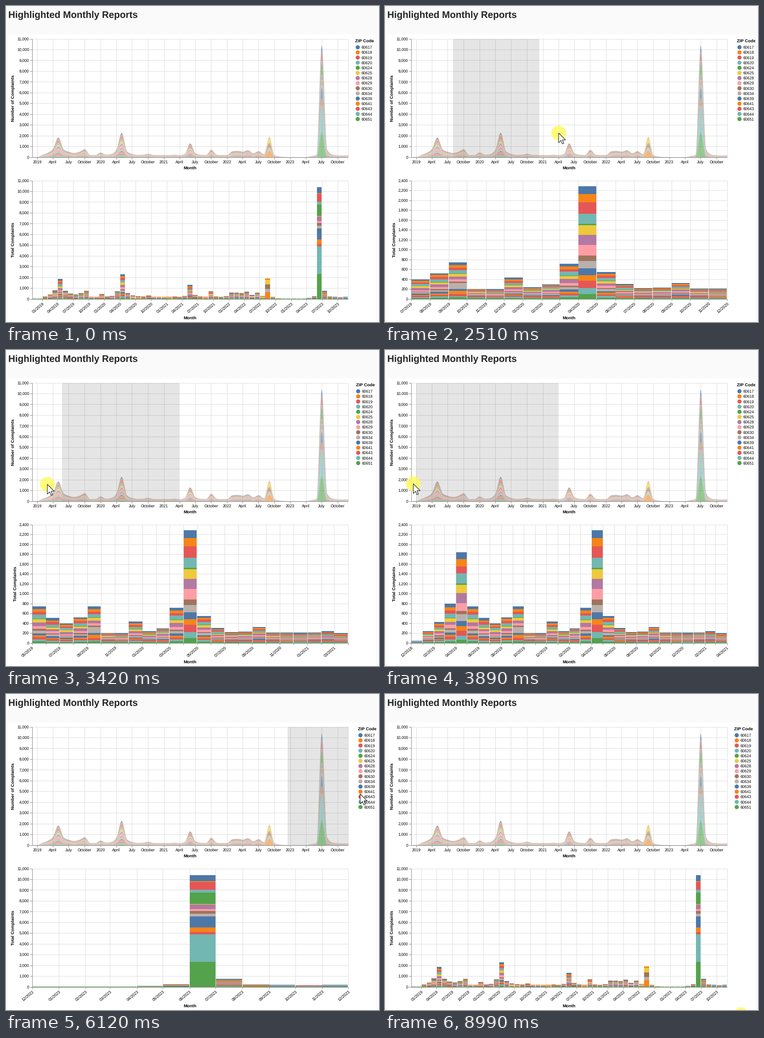
Recreate the animation shown at these times as a matplotlib script. Size 812x689 px, loop 9.05 s.

```python
import numpy as np
import matplotlib.pyplot as plt
from matplotlib.animation import FuncAnimation
from matplotlib.collections import LineCollection, PolyCollection
from matplotlib.patches import Circle, Polygon, Rectangle

W, H, DPI = 812, 689, 64
PT = 72 / DPI                       # points per pixel
LEFT, RIGHT, HEIGHT = 56.5, 744.5, 258
TOP_BASE, LOW_BASE = 329.5, 638.5
STEP_MS, LOOP_MS = 50, 9050
PAGE = "#fafafa"

plt.rcParams.update({"font.family": "Liberation Sans", "text.hinting": "none"})

ZIPS = [60617, 60618, 60619, 60620, 60624, 60625, 60628, 60629,
        60630, 60634, 60639, 60641, 60643, 60644, 60651]
PALETTE = ["#4c78a8", "#f58518", "#e45756", "#72b7b2", "#54a24b",
           "#eeca3b", "#b279a2", "#ff9da6", "#9d755d", "#bab0ac"]
COLORS = [PALETTE[i % 10] for i in range(15)]
STACK_COLORS = COLORS[::-1]         # bottom of the stack first

rng = np.random.default_rng(4)


def monthly_totals():
    """Quiet level plus surges that build up and fade, from December 2018."""
    k = np.arange(61)
    quiet = np.interp(k, [0, 2, 3, 46, 47, 52, 53, 60], [8, 70, 205, 205, 20, 15, 110, 180])
    totals = quiet * rng.uniform(.85, 1.15, 61)
    surges = [  # month, peak, rise, fall
        (5, 1840, .43, .4), (10, 741, .7, .27), (13, 437, .45, .3),
        (17, 2283, .31, .24), (22, 325, .65, .65), (30, 1290, .23, .29),
        (34, 690, .25, .22), (38, 560, .3, .5), (39, 590, .5, .75),
        (41, 650, .8, .5), (43, 570, .5, .5), (45, 1890, .15, .1),
        (55, 10400, .021, .07)]
    for month, peak, rise, fall in surges:
        d = abs(k - month)
        curve = peak * np.where(k < month, rise ** d**.8, fall ** d**.5)
        totals = np.maximum(totals, np.where(d <= 3, curve, 0))
    return np.round(totals)


def layer_shares():
    """Typical mix with jitter; three months lean on certain layers (percent)."""
    typical = [4.2, 4.3, 6.9, 4.4, 6.3, 6.4, 4.2, 8.7, 9.8, 7.4, 1.6, 9.4, 8.5, 7.4, 8.3]
    shares = typical * rng.uniform(.75, 1.25, (61, 15))
    shares[10, [3, 5]] = 10.8, 19.6
    shares[45] = .5
    shares[45, [3, 5, 6, 9, 13]] = 30, 17, 21, 21, 5
    shares[55] = [22.4, 24.4, 2, 4.1, 9.8, 2.5, 2.7, 1.4, 4.1, .7, 10.2, 2.4, 6.7, 1.1, 5.4]
    return shares / shares.sum(axis=1, keepdims=True)


TOTALS = monthly_totals()
LEVELS = np.hstack([np.zeros((61, 1)), np.cumsum(layer_shares(), axis=1) * TOTALS[:, None]])

MONTHS = np.arange("2018-11", "2024-01", dtype="datetime64[M]")
DAYS = MONTHS.astype("datetime64[D]").astype(float)


def scale_x(days, first, last):
    return LEFT + (RIGHT - LEFT) * (days - first) / (last - first)


MONTH_X = scale_x(DAYS, DAYS[1], DAYS[-1])

fig = plt.figure(figsize=(W / DPI, H / DPI), dpi=DPI, facecolor=PAGE)
ax = fig.add_axes([0, 0, 1, 1])
ax.set(xlim=(0, W), ylim=(H, 0))
ax.axis("off")


def text(x, y, s, size=8.6, **kw):
    kw = {"va": "baseline", "color": "black", "zorder": 5, **kw}
    return ax.text(x, y, s, fontsize=size * PT, **kw)


def title(x, y, s, **kw):
    return text(x, y, s, 9.45, weight="bold", **kw)


def side_title(x, y, s):
    return title(x, y, s, rotation=90, ha="center", va="center")


def lines(segs, color, z):
    return ax.add_collection(
        LineCollection(segs, colors=color, linewidths=PT, zorder=z), autolim=False)


def frame_lines(base):
    top = base - HEIGHT
    lines([[(LEFT, top), (RIGHT, top)], [(RIGHT, top), (RIGHT, base)]], "#dddddd", 1)
    lines([[(LEFT, top), (LEFT, base)], [(LEFT, base), (RIGHT, base)]], "#888888", 4)


def axes_ticks(base, xs, ys):
    top = base - HEIGHT
    grid = [[(x, top), (x, base)] for x in xs] + [[(LEFT, y), (RIGHT, y)] for y in ys]
    ticks = ([[(x, base), (x, base + 4.5)] for x in xs]
             + [[(LEFT - 4.5, y), (LEFT, y)] for y in ys])
    return [lines(grid, "#dddddd", 1), lines(ticks, "#888888", 4)]


def value_labels(ys, values):
    return [text(50.3, y + 3.1, f"{v:,.0f}", ha="right") for y, v in zip(ys, values)]


def monotone(x, y, xs):
    """Monotone cubic through the points."""
    h = np.diff(x)
    s = np.diff(y) / h
    p = (s[:-1] * h[1:] + s[1:] * h[:-1]) / (h[:-1] + h[1:])
    m = np.empty_like(y)
    m[1:-1] = (np.sign(s[:-1]) + np.sign(s[1:])) * np.minimum(
        np.minimum(abs(s[:-1]), abs(s[1:])), abs(p) / 2)
    m[0], m[-1] = (3 * s[0] - m[1]) / 2, (3 * s[-1] - m[-2]) / 2
    i = np.clip(np.searchsorted(x, xs, side="right") - 1, 0, len(h) - 1)
    u = (xs - x[i]) / h[i]
    return ((2 * u**3 - 3 * u**2 + 1) * y[i] + (u**3 - 2 * u**2 + u) * h[i] * m[i]
            + (3 * u**2 - 2 * u**3) * y[i + 1] + (u**3 - u**2) * h[i] * m[i + 1])


# Page and upper chart
ax.add_patch(Rectangle((5, 62), 801, 640, fc="white", lw=0, zorder=0))
ax.add_patch(Rectangle((806, 62), 6, 640, fc=PAGE, lw=0, zorder=8))
text(5, 26, "Highlighted Monthly Reports", 20.65, weight="bold", color="#252526")

frame_lines(TOP_BASE)
quarters = range(2, 62, 3)
top_values = np.arange(0, 11001, 1000)
top_ys = TOP_BASE - HEIGHT * top_values / 11000
axes_ticks(TOP_BASE, MONTH_X[list(quarters)], top_ys)
value_labels(top_ys, top_values)
for n, i in enumerate(quarters):
    name = str(2019 + n // 4) if n % 4 == 0 else ("April", "July", "October")[n % 4 - 1]
    text(MONTH_X[i], 343.2, name, ha="center")
title(400.5, 355.7, "Month", ha="center")
side_title(15.8, 201, "Number of Complaints")

xs = np.linspace(LEFT, RIGHT, 1377)
edges = [TOP_BASE - HEIGHT / 11000 * monotone(MONTH_X[1:], LEVELS[:, j], xs)
         for j in range(16)]
for j, color in enumerate(STACK_COLORS):
    ax.fill_between(xs, edges[j], edges[j + 1], color=color, alpha=0.6, lw=0, zorder=3)

# Lower chart frame and legend
frame_lines(LOW_BASE)
month_title = title(400.5, 682.7, "Month", ha="center")
total_title = side_title(15.8, 509.5, "Total Complaints")

legend = [(title(760.5, 79.2, "ZIP Code"), 760.5)]
dots = []
for n, (code, color) in enumerate(zip(ZIPS, COLORS)):
    y = 90 + 11.18 * n
    dots.append(ax.add_patch(Circle((765.7, y), 4.5, fc=color, lw=0, zorder=5)))
    legend.append((text(774, y + 3.1, str(code)), 774))

# Brush and pointer
brush = ax.add_patch(Rectangle((0, 0), 0, HEIGHT, fc=(.2, .2, .2, .125),
                               ec="white", lw=PT, zorder=2))
brush.set_clip_path(Rectangle((LEFT, TOP_BASE - HEIGHT), RIGHT - LEFT, HEIGHT,
                              transform=ax.transData))
halo = ax.add_patch(Circle((0, 0), 16, fc="#fffc58", alpha=.8, lw=0, zorder=10))
ARROW = 1.25 * np.array([(0, 0), (0, 17), (4, 13), (6.5, 19), (9, 18), (6.6, 12), (12, 12)])
arrow = ax.add_patch(Polygon(ARROW, fc="white", ec="black", lw=PT, zorder=11))

START = 569, 541
MOVES = [  # begin, end, x, y, ease-out power
    (190, 330, 365, 330, 1), (500, 940, 163, 253, 1), (1080, 1900, 300, 272, 4.65),
    (2360, 2510, 378, 277, 1), (3200, 3420, 90, 293, 2.5), (3420, 4100, 47, 291, 1),
    (4500, 4770, 473, 298, 1), (5230, 5500, 612, 290, 1), (5500, 6100, 771, 218, 1),
    (6450, 6850, 602, 290, 1), (6850, 7220, 611, 598, 1), (7490, 7710, 738, 302, 1),
    (7890, 8240, 757, 664, 1), (8940, 8950, 775, 699, 1)]
ANCHORS = [(0, None), (1080, 147), (2790, None), (2850, 378),
           (4770, None), (5590, 612), (6850, None)]
LAG = 90                            # the brush trails the pointer


def pointer(t):
    pos = np.array(START, float)
    for begin, end, x, y, power in MOVES:
        u = np.clip((t - begin) / (end - begin), 0, 1)
        pos += (np.array([x, y]) - pos) * (1 - (1 - u) ** power)
    return pos


def selection(t):
    anchor = [a for start, a in ANCHORS if t >= start][-1]
    if anchor is None:
        return None
    edge = np.clip(pointer(t - LAG)[0], LEFT, RIGHT)
    return min(anchor, edge), max(anchor, edge)


def nice_step(top):
    raw = top / 10
    power = 10 ** np.floor(np.log10(raw))
    e = raw / power
    return power * (10 if e >= 50**.5 else 5 if e >= 10**.5 else 2 if e >= 2**.5 else 1)


def move_legend(shift):
    for label, x in legend:
        label.set_x(x + shift)
    for dot in dots:
        dot.center = (765.7 + shift, dot.center[1])


def draw_bars(first, last):
    """Lower chart for the months first..last; returns its artists."""
    if first > last:
        total_title.set_x(42)
        month_title.set_y(661)
        move_legend(0)
        return []
    month_title.set_y(682.7)
    d0, d1 = DAYS[first - 1], DAYS[last]
    x = scale_x(DAYS[first - 1:last + 1], d0, d1)
    peak = TOTALS[first - 1:last].max()
    step = nice_step(peak)
    top = np.ceil(peak / step) * step
    values = np.arange(0, top + step / 2, step)
    ys = LOW_BASE - HEIGHT * values / top

    y = LOW_BASE - HEIGHT * LEVELS[first - 1:last] / top
    x0 = np.repeat(x[:-1] + .4, 15)
    x1 = np.repeat(x[1:] - .4, 15)
    y0, y1 = y[:, :-1].ravel(), y[:, 1:].ravel()
    boxes = np.stack([np.stack(p, -1) for p in ((x0, y0), (x1, y0), (x1, y1), (x0, y1))], 1)
    bars = PolyCollection(boxes, facecolors=STACK_COLORS * (last - first + 1),
                          linewidths=0, zorder=3)
    ax.add_collection(bars, autolim=False)

    quarterly = d1 - d0 > 894
    ticks = [i for i in range(first - 1, last + 1) if not quarterly or i % 3 == 2]
    tick_x = scale_x(DAYS[ticks], d0, d1)
    pitch = (RIGHT - LEFT) / (d1 - d0) * (91 if quarterly else 30.4)
    skip = 2 if pitch < 32 else 1
    made = [bars, *axes_ticks(LOW_BASE, tick_x, ys), *value_labels(ys, values)]
    for i, tx in list(zip(ticks, tick_x))[::skip]:
        name = f"{(10 + i) % 12 + 1:02d}/{2018 + (10 + i) // 12}"
        made.append(text(tx + 4.4, 649.6, name, rotation=40, ha="right",
                         rotation_mode="anchor"))

    label = f"{top:,.0f}"
    width = .86 * sum(2.78 if c == "," else 5.56 for c in label)
    total_title.set_x(15.8 + 26.3 - width)
    end_tick = ticks[-1] == last
    end_label = end_tick and (len(ticks) - 1) % skip == 0
    move_legend(6 if end_label else 1 if end_tick else 0)
    return made


shown = {"span": None, "artists": []}


def update(i):
    t = STEP_MS * i + 20
    sel = selection(t)
    brush.set_visible(sel is not None)
    span = (1, 61)
    if sel:
        lo, hi = sel
        brush.set_bounds(lo, TOP_BASE - HEIGHT - 2, hi - lo, HEIGHT + 4)
        span = (max(1, int(np.searchsorted(MONTH_X, lo))),
                int(np.searchsorted(MONTH_X, hi, side="right")) - 1)
    if span != shown["span"]:
        for artist in shown["artists"]:
            artist.remove()
        shown.update(span=span, artists=draw_bars(*span))

    pos = pointer(t)
    on = 190 <= t < 8240 or t >= 8960
    arrow.set_visible(on)
    arrow.set_xy(ARROW + pos)
    halo.set_visible(on and not (4170 <= t < 4300 or 6100 <= t < 6450))
    halo.center = pos
    return []


anim = FuncAnimation(fig, update, frames=LOOP_MS // STEP_MS, interval=STEP_MS,
                     repeat=True, repeat_delay=0, blit=False)
plt.show()
```
